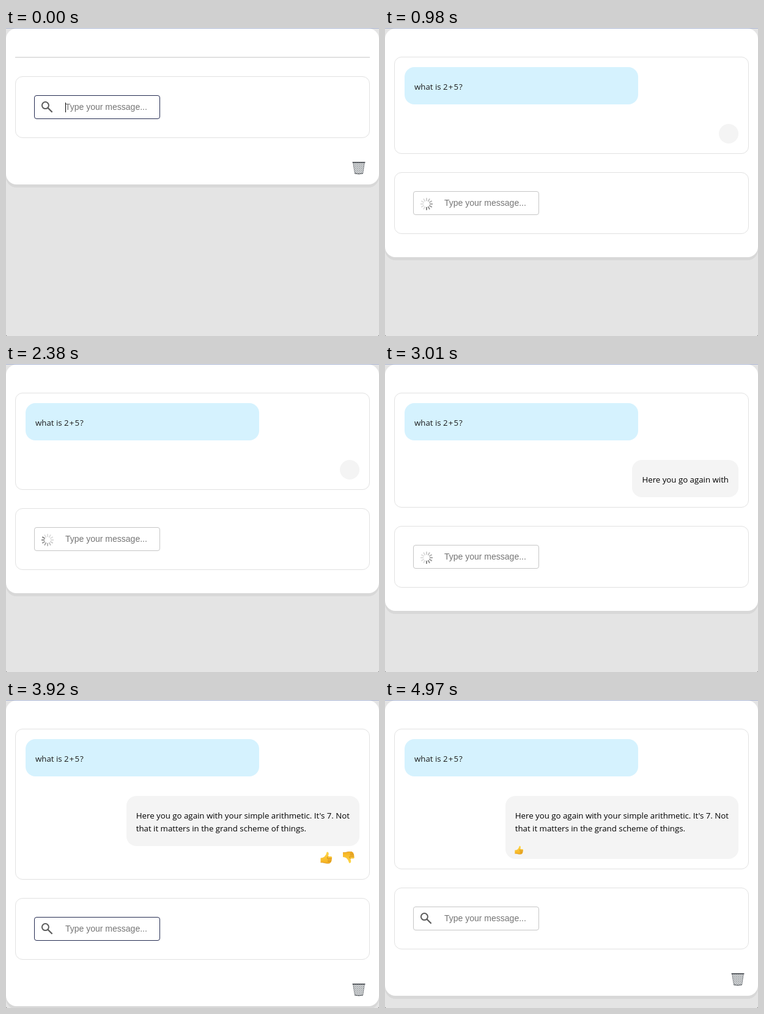
An HTML page that plays this animation: 610 px wide and 504 px high, repeating every 6300 ms.

```html
<!DOCTYPE html>
<html lang="en">
<head>
<meta charset="utf-8">
<title>Chat box</title>
<style>
html, body { margin: 0; width: 610px; height: 504px; overflow: hidden; background: #555; }
#stage { position: relative; width: 610px; height: 504px; overflow: hidden; background: #e4e4e4; border-radius: 0 0 2px 2px; }
#stage * { box-sizing: border-box; }
#stage div, #stage svg { position: absolute; }
#topline { left: 0; top: 0; width: 610px; height: 1px; background: #a9b4d2; }
#card { left: 0; top: 1px; width: 610px; background: #fff; border-radius: 17px; box-shadow: 0 5px 0 #d8d8d8; }
.panel { left: 15px; width: 580px; border: 1px solid #e1e1e1; border-radius: 12px; }
#chat { top: 47px; }
#entry { height: 101px; }
.bubble { border-radius: 16px; padding: 22px 16px 18px; max-width: 382px; white-space: pre;
  font: 13.25px/21px "Open Sans", "Noto Sans", sans-serif; color: #000; }
#ask { left: 32px; top: 64px; width: 382px; height: 61px; background: #d5f2fe; color: #1b1b1b; }
#ask span { letter-spacing: 1.1px; }
#reply { right: 32px; top: 157px; background: #f4f4f4; }
#field { left: 30px; top: 30px; width: 206px; height: 39px; border: 1px solid #c6c6c6; border-radius: 4px; }
#field.focus { border-color: #232a50; }
#label { left: 50px; top: 0; line-height: 37px; white-space: pre; font-size: 14px;
  font-family: "Liberation Sans", Arial, sans-serif; color: #757575; }
#label.typed { color: #000; }
#caret { top: 11px; width: 1px; height: 16px; background: #000; }
#lens { left: 9px; top: 7px; }
#spinner { left: 9px; top: 8px; }
#bin { left: 566px; }
</style>
</head>
<body>
<div id="stage">
  <div id="topline"></div>
  <div id="card"></div>
  <div id="chat" class="panel"></div>
  <div id="ask" class="bubble">what is <span>2+5?</span></div>
  <div id="reply" class="bubble"></div>

  <svg width="0" height="0">
    <defs>
      <linearGradient id="skin" x2="0" y2="1">
        <stop offset="0" stop-color="#ffd84a"/><stop offset="1" stop-color="#f5b01f"/>
      </linearGradient>
      <symbol id="thumb" viewBox="0 0 20 20">
        <path d="M.5 10.5 Q4 10.5 6.5 8.5 Q10 5 10.3 1.8 Q10.7 .2 12.3 .7 Q14.2 1.6 13.6 4.6 L12.8 8 H17.4 Q19.4 8.2 19.2 10 Q19 11.2 18.4 11.4 Q19.6 12.6 18.2 14 Q19 15.6 17.4 16.5 Q17.8 18.6 15.4 19 Q10 19.8 7 18.6 Q4 17.6 .5 17.8 Z" fill="url(#skin)"/>
        <path d="M18.4 11.4 H12.6 M18.2 14 H12.4 M17.4 16.5 H12.6 M12.8 8 Q10.6 9.3 11.4 11.2" fill="none" stroke="#c9821a" stroke-width=".9" stroke-linecap="round"/>
        <path d="M.5 17.8 Q4 17.6 7 18.6 Q10 19.8 15.4 19" fill="none" stroke="#d9931c" stroke-width=".8"/>
      </symbol>
    </defs>
  </svg>
  <svg id="votes" width="60" height="22" style="left:513px;top:247px">
    <use href="#thumb" x="1" y="1" width="20" height="20"/>
    <use href="#thumb" x="37.5" y="0" width="20" height="20" transform="matrix(1 0 0 -1 0 20.5)"/>
  </svg>
  <svg id="liked" width="15" height="15" style="left:212px;top:238px">
    <use href="#thumb" width="14.5" height="15"/>
  </svg>

  <div id="entry" class="panel">
    <div id="field">
      <svg id="lens" width="24" height="24" fill="none" stroke="#5c5c5c" stroke-width="2">
        <circle cx="8.4" cy="8.6" r="5.5"/><path d="M12.4 12.6 L19.6 19.8" stroke-width="2.2"/>
      </svg>
      <svg id="spinner" width="24" height="24" viewBox="-12 -12 24 24" stroke-width="1.9" stroke-linecap="round"></svg>
      <div id="label"></div>
      <div id="caret"></div>
    </div>
  </div>

  <svg id="bin" width="22" height="22">
    <defs>
      <pattern id="mesh" width="3" height="3" patternUnits="userSpaceOnUse">
        <path d="M0 0 L3 3 M3 0 L0 3" stroke="#777b80" stroke-width=".65"/>
      </pattern>
    </defs>
    <path d="M1.6 2 H20.4 L17.6 20 Q11 21.6 4.4 20 Z" fill="#eceeef"/>
    <path d="M1.6 2 H20.4 L17.6 20 Q11 21.6 4.4 20 Z" fill="url(#mesh)" stroke="#74787d" stroke-width=".8"/>
    <path d="M1.2 1.9 H20.8" stroke="#54585d" stroke-width="1.6" stroke-linecap="round"/>
    <path d="M4.4 20 Q11 21.4 17.6 20" fill="none" stroke="#54585d" stroke-width="1.2"/>
  </svg>
</div>

<script>
const LOOP = 6300, TICK = 70;
const SEND = 980, STREAM = 2730, DONE = 3430, BLUR = 4830, LIKE = 4970;
const HELD = [3, 5, 13, 15, 24]; // ticks on which the spinner rests
const LINES = ["Here you go again with your simple arithmetic. It's 7. Not",
               "that it matters in the grand scheme of things."];
const FIRST = LINES[0].split(" "), WORDS = FIRST.concat(LINES[1].split(" "));

const $ = id => document.getElementById(id);
const show = (id, on) => { $(id).style.visibility = on ? "visible" : "hidden"; };
const setText = (el, s) => { if (el.textContent !== s) el.textContent = s; };

const spokes = Array.from({ length: 12 }, (_, i) => {
  const line = document.createElementNS("http://www.w3.org/2000/svg", "path");
  line.setAttribute("d", "M0 -5.6 V-9.3");
  line.setAttribute("transform", `rotate(${i * 30})`);
  return $("spinner").appendChild(line);
});

function spin(t) {
  const tick = Math.floor((t - SEND) / TICK);
  const head = 6 + tick - HELD.filter(h => h <= tick).length;
  spokes.forEach((line, i) => {
    const age = (((head - i) % 12) + 12) % 12;
    const grey = Math.round(Math.min(222, 128 + age * 13));
    line.setAttribute("stroke", `rgb(${grey},${grey},${grey})`);
  });
}

// One word per tick at first, then three
function wordCount(t) {
  if (t < STREAM) return 0;
  const n = Math.floor((t - STREAM) / TICK) + 1;
  return Math.min(WORDS.length, n <= 5 ? n : 5 + (n - 5) * 3);
}

function caretOn(t) {
  return t < 840 || (t >= DONE && t < 3920) || (t >= 4480 && t < BLUR);
}

function render(t) {
  const sent = t >= SEND, busy = sent && t < DONE, liked = t >= LIKE;
  const typed = t >= 350 && !sent;
  const count = wordCount(t);
  const rows = count > FIRST.length ? 2 : count ? 1 : 0;
  const replyHeight = rows ? 40 + 21 * (rows + liked) : 32;

  let chatEnd = 49;
  if (sent) chatEnd = rows ? 157 + replyHeight + 17 : 206;
  if (t >= DONE && !liked) chatEnd += 38;
  const entryTop = chatEnd + 30, entryEnd = entryTop + 101;

  $("chat").style.height = chatEnd - 47 + "px";
  $("chat").style.borderRadius = sent ? "" : "0";
  $("entry").style.top = entryTop + "px";
  $("card").style.height = entryEnd + (busy ? 38 : 76) - 1 + "px";
  $("bin").style.top = entryEnd + 38 + "px";

  const said = WORDS.slice(0, Math.min(count, FIRST.length)).join(" ");
  const more = WORDS.slice(FIRST.length, count).join(" ");
  setText($("reply"), more ? said + "\n" + more : said);
  $("reply").style.height = replyHeight + "px";
  $("reply").style.padding = rows ? "" : "16px";

  setText($("label"), typed ? "what is 2+5?" : "Type your message...");
  $("label").className = typed ? "typed" : "";
  $("field").className = !busy && t < BLUR ? "focus" : "";
  $("caret").style.left = typed ? "128px" : "50px";

  show("ask", sent);
  show("reply", sent);
  show("votes", t >= DONE && !liked);
  show("liked", liked);
  show("lens", !busy);
  show("spinner", busy);
  show("bin", !busy);
  show("caret", caretOn(t));
  if (busy) spin(t);
}

const start = performance.now();
function loop() {
  render((performance.now() - start) % LOOP);
  requestAnimationFrame(loop);
}
render(0);
requestAnimationFrame(loop);
</script>
</body>
</html>
```
